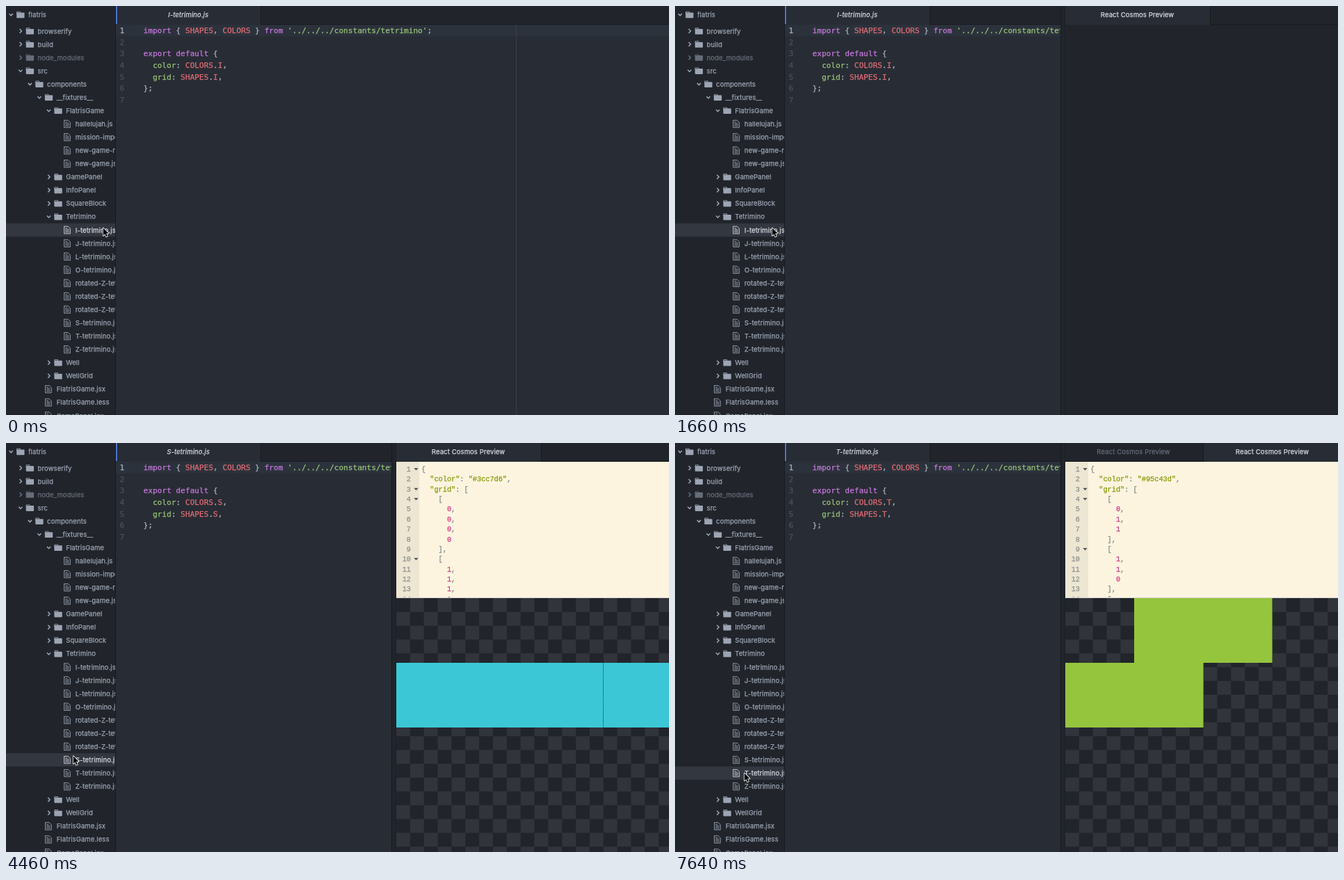
An HTML page with a canvas for the animation above (8 s loop, 953 by 588 pixels).

```html
<!DOCTYPE html>
<html lang="en">
<head>
<meta charset="utf-8">
<title>Editor preview</title>
<style>
html, body { margin: 0; width: 100%; height: 100%; overflow: hidden; background: #282c34; }
canvas { display: block; width: 953px; height: 588px; }
</style>
</head>
<body>
<canvas id="stage"></canvas>
<script>
const W = 953, H = 588, LOOP = 8000;
const canvas = document.getElementById('stage');
const ctx = canvas.getContext('2d');
const dpr = window.devicePixelRatio || 1;
canvas.width = W * dpr;
canvas.height = H * dpr;

const UI = '9.53px Inter, "DejaVu Sans", sans-serif';
const CODE = '11.11px "DejaVu Sans Mono", monospace';
const JSON_FONT = '10.25px "Liberation Mono", monospace';
const C = {
  bg: '#282c34', side: '#21252b', line: '#181a1f', text: '#9da5b4', bright: '#d7dae0',
  dim: '#666c78', row: '#333740', active: '#2c323c', blue: '#568af2',
  plain: '#abb2bf', key: '#c678dd', red: '#e06c75', str: '#98c379'
};

function rect(x, y, w, h, color) {
  ctx.fillStyle = color;
  ctx.fillRect(x, y, w, h);
}

function box(x, y, w, h, r, fill, stroke, lw = 1) {
  ctx.beginPath();
  ctx.roundRect(x, y, w, h, r);
  if (fill) { ctx.fillStyle = fill; ctx.fill(); }
  if (stroke) { ctx.strokeStyle = stroke; ctx.lineWidth = lw; ctx.stroke(); }
}

// A hairline stroke gives the slightly heavier desktop text rendering
function text(s, x, y, color, font = UI, align = 'left') {
  ctx.font = font;
  ctx.letterSpacing = font.includes('Inter') ? '.1px' : '0px';
  ctx.textAlign = align;
  ctx.fillStyle = ctx.strokeStyle = color;
  ctx.lineWidth = .25;
  ctx.fillText(s, x, y);
  ctx.strokeText(s, x, y);
  return x + ctx.measureText(s).width;
}

function clipped(x, y, w, h, draw) {
  ctx.save();
  ctx.beginPath();
  ctx.rect(x, y, w, h);
  ctx.clip();
  draw();
  ctx.restore();
}

function path(points, color, lw) {
  ctx.beginPath();
  points.forEach(([x, y]) => ctx.lineTo(x, y));
  ctx.strokeStyle = color;
  ctx.lineWidth = lw;
  ctx.stroke();
}

// Tree: depth, kind (+ open folder, > closed folder, - file), name
const tree = `0+flatris
1>browserify
1>build
1>node_modules
1+src
2+components
3+__fixtures__
4+FlatrisGame
5-hallelujah.js
5-mission-impossible.js
5-new-game-run.js
5-new-game.js
4>GamePanel
4>InfoPanel
4>SquareBlock
4+Tetrimino
5-I-tetrimino.js
5-J-tetrimino.js
5-L-tetrimino.js
5-O-tetrimino.js
5-rotated-Z-tetrimino-1.js
5-rotated-Z-tetrimino-2.js
5-rotated-Z-tetrimino-3.js
5-S-tetrimino.js
5-T-tetrimino.js
5-Z-tetrimino.js
4>Well
4>WellGrid
3-FlatrisGame.jsx
3-FlatrisGame.less
3-GamePanel.jsx`.split('\n').map(s => ({ depth: +s[0], kind: s[1], name: s.slice(2) }));

function folderIcon(x, y, color) {
  box(x, y - 4.7, 5.6, 4, .8, color);
  box(x, y - 3.1, 11.3, 7.8, .8, color);
  rect(x + .8, y - 3.9, 4, .8, C.side);
}

function fileIcon(x, y, color) {
  path([[x + .4, y - 5.2], [x + 6, y - 5.2], [x + 9.1, y - 2.1], [x + 9.1, y + 5.2],
    [x + .4, y + 5.2], [x + .4, y - 5.6]], color, .9);
  for (let i = 0; i < 4; i++) rect(x + 2, y - 3 + i * 1.9, i ? 5.5 : 3, .8, color);
}

function chevron(x, y, open, color) {
  path(open ? [[x - 2.6, y - 1.4], [x, y + 1.3], [x + 2.6, y - 1.4]]
    : [[x - 1.2, y - 3], [x + 1.6, y], [x - 1.2, y + 3]], color, 1.5);
}

function drawTree(selected) {
  rect(0, 0, 158, H, C.side);
  clipped(0, 0, 157.5, H, () => tree.forEach(({ depth, kind, name }, i) => {
    const y = i ? 36 + 19.07 * (i - 1) : 12.5;
    const on = name === selected + '-tetrimino.js';
    const color = on ? C.bright : name === 'node_modules' ? C.dim : C.text;
    const x = 13.55 * depth;
    if (on) rect(0, y - 9.5, 158, 19, C.row);
    if (kind === '-') fileIcon(x + 15.5, y, color);
    else {
      chevron(x + 7.3, y, kind === '+', color);
      folderIcon(x + 15.2, y, color);
    }
    text(name, x + 32, y + 3.5, color);
  }));
  rect(157, 0, 1, H, C.line);
}

function drawCode(letter, right, caret) {
  rect(158, 0, right - 158, H, C.bg);
  rect(158, 26.7, right - 158, 16.7, C.active);
  if (right === W) rect(733, 27, 1, H, '#3b3f48');
  const lines = [
    [['import', C.key], [' { ', C.plain], ['SHAPES', C.red], [', ', C.plain], ['COLORS', C.red],
      [' } ', C.plain], ['from', C.key], [' ', C.plain],
      ["'../../../constants/tetrimino'", C.str], [';', C.plain]],
    [],
    [['export default', C.key], [' {', C.plain]],
    ...[['color', 'COLORS'], ['grid', 'SHAPES']].map(([prop, from]) =>
      [['  ' + prop, C.str], [': ', C.plain], [from, C.red], ['.', C.plain], [letter, C.red], [',', C.plain]]),
    [['};', C.plain]],
    []
  ];
  clipped(158, 0, right - 158, H, () => lines.forEach((line, i) => {
    const y = 39 + i * 16.67;
    text(i + 1, 163.5, y, i ? '#495162' : C.plain, CODE);
    line.reduce((x, [s, color]) => text(s, x, y, color, CODE), 197.5);
  }));
  if (caret) rect(197.5, 28, 1.6, 15, '#528bff');
  rect(158, 0, right - 158, 27, C.side);
  rect(158, 26, right - 158, 1, C.line);
  rect(158, 0, 208, 27, C.bg);
  rect(366, 0, 1, 27, C.line);
  rect(158, 0, 1.6, 26, C.blue);
  text(letter + '-tetrimino.js', 262, 16, C.bright, 'italic ' + UI, 'center');
}

const shapes = {
  I: { color: '#3cc7d6', grid: [[0, 0, 0, 0], [1, 1, 1, 1], [0, 0, 0, 0], [0, 0, 0, 0]] },
  S: { color: '#95c43d', grid: [[0, 1, 1], [1, 1, 0], [0, 0, 0]] }
};

function tabs(count) {
  const title = 'React Cosmos Preview';
  rect(554, 0, W - 554, H, C.side);
  rect(554, 0, 1, H, C.line);
  rect(560, 0, 1, H, '#1c1f25');
  rect(560, 26, W - 560, 1, C.line);
  if (count === 1) {
    rect(561, 0, 208, 27, C.bg);
    rect(769, 0, 1, 27, C.line);
    text(title, 664.5, 16, C.bright, UI, 'center');
  } else {
    text(title, 659, 16, '#636a77', UI, 'center');
    rect(759, 0, 1, 27, C.line);
    rect(760, 0, W - 760, 27, C.bg);
    text(title, 858.5, 16, C.bright, UI, 'center');
  }
}

function jsonView(shape, folds) {
  rect(561, 27, W - 561, 195, '#fdf4e0');
  rect(561, 27, 33, 195, '#ede6d2');
  const lines = JSON.stringify(shape, null, 2).split('\n').slice(0, 14);
  clipped(561, 27, W - 561, 195, () => lines.forEach((line, i) => {
    const y = 41 + i * 14.36;
    text(i + 1, 582, y, '#8b8f8c', JSON_FONT, 'right');
    if (folds && /[[{]$/.test(line)) {
      ctx.fillStyle = '#4f5558';
      ctx.beginPath();
      ctx.moveTo(586.3, y - 5);
      ctx.lineTo(592.7, y - 5);
      ctx.lineTo(589.5, y - 1.5);
      ctx.fill();
    }
    line.match(/"[^"]*"|\d+|[^"\d]+/g).reduce((x, s) =>
      text(s, x, y, s[0] === '"' ? '#859900' : /\d/.test(s) ? '#d33682' : '#7b8a8c', JSON_FONT), 597);
  }));
  rect(561, 222, W - 561, 1, '#d9d7d0');
}

function blocks({ color, grid }) {
  const size = 19.85;
  clipped(561, 223, W - 561, H - 223, () => {
    for (let r = 0; r < 19; r++)
      for (let c = 0; c < 20; c++)
        if ((r + c) % 2) rect(561 + c * size, 223 + r * size, size, size, '#31343b');
    grid.forEach((row, r) => row.forEach((cell, c) => {
      if (cell) rect(Math.round(561 + c * 99.2), 223 + r * 93, 99.5, 93, color);
    }));
  });
}

const commands = [
  ['About: View Release Notes'], ['Application: About'], ['Application: Add Project Folder', '⇧⌘O'],
  ['Application: Bring All Windows To Front'], ['Application: Hide', '⌘H'],
  ['Application: Hide Other Applications', '⌥⌘H'], ['Application: Install Update'],
  ['Application: Minimize', '⌘M']
];

function drawPalette(query, caret) {
  const found = query.length > 2;
  const listH = found ? 34 : 247;
  rect(0, 0, W, H, 'rgba(15,17,20,.55)');
  ctx.save();
  ctx.shadowColor = 'rgba(0,0,0,.5)';
  ctx.shadowBlur = 8 * dpr;
  ctx.shadowOffsetY = 2 * dpr;
  box(242, -10, 476.5, listH + 50, 4, '#262a31');
  ctx.restore();
  box(249.2, .8, 462.5, 23.2, 3, '#1b1d23', C.blue, 1.6);
  const end = text(query, 255, 16.3, C.bright, CODE);
  if (caret) rect(end, 5, 1.5, 14, '#528bff');

  clipped(249, 32, 463, listH + 1, () => {
    const list = found ? [['React Cosmos: Toggle', '^⇧R']] : commands;
    list.forEach(([label, keys], i) => {
      const y = 32 + i * 34.17;
      rect(250, y, 461, 34.17, i ? '#2c3039' : '#3a3f4b');
      rect(250, y + 33.5, 461, 1, C.line);
      const color = i ? C.text : C.bright, base = y + 20.6;
      if (found) {
        const x = text('React ', 259, base, color);
        text(': Toggle', text('Cosmos', x, base, color, 'bold ' + UI), base, color);
      } else text(label, 259, base, color);
      if (!keys) return;
      const w = keys.length === 2 ? 27 : found ? 34 : 37;
      box(704.5 - w, y + 6.8, w, 20.4, 2, '#484d59', '#585d68');
      text(keys, 704.5 - w / 2, base, C.bright, UI.replace('9.53', '10.3'), 'center');
    });
  });
  path([[249.5, 32], [249.5, 32 + listH], [711.5, 32 + listH], [711.5, 32], [249.5, 32]], C.line, 1);
}

const ease = p => p * p * (3 - 2 * p);
const clamp = p => Math.max(0, Math.min(1, p));

function pointer(t) {
  const first = ease(clamp((Math.floor((t - 2820) / 164) * 164 - 164) / 1148));
  const second = ease(clamp((Math.floor((t - 6370) / 158) * 158 - 158) / 632));
  return [139.7 - 43 * first + 3 * second, 319 + 131 * first + 24.5 * second];
}

function drawPointer(x, y) {
  const points = [[0, 0], [0, 11.2], [2.6, 8.8], [4.3, 12.8], [6.1, 12], [4.4, 8.1], [7.9, 7.9]];
  ctx.beginPath();
  points.forEach(([dx, dy]) => ctx.lineTo(x + dx, y + dy));
  ctx.closePath();
  ctx.strokeStyle = '#fff';
  ctx.lineWidth = 1.6;
  ctx.lineJoin = 'round';
  ctx.stroke();
  ctx.fillStyle = '#000';
  ctx.fill();
}

// Value of the last [time, value] step reached
const at = (t, steps) => steps.reduce((v, [time, value]) => t >= time ? value : v, null);

function draw(t) {
  ctx.setTransform(dpr, 0, 0, dpr, 0, 0);
  ctx.lineJoin = 'miter';
  ctx.miterLimit = 2;
  const split = t >= 1660;
  const letter = at(t, [[0, 'I'], [4296, 'S'], [7490, 'T']]);
  const preview = at(t, [[2560, 'I'], [5980, null], [6370, 'S']]);
  drawTree(at(t, [[0, 'I'], [4132, 'S'], [7160, 'T']]));
  drawCode(letter, split ? 554 : W, t >= 5980 && t < 6370);
  if (split) tabs(t < 5980 ? 1 : 2);
  if (preview) {
    jsonView(shapes[preview], at(t, [[2820, true], [6370, false], [6528, true]]));
    blocks(shapes[preview]);
  }
  if (t >= 300 && !split) {
    const query = at(t, [[300, ''], [530, 'c'], [720, 'cos'], [900, 'cosmo'], [1090, 'cosmos']]);
    drawPalette(query, t >= 530 && t < 1510);
  }
  drawPointer(...pointer(t));
}

const start = performance.now();
function tick() {
  draw((performance.now() - start) % LOOP);
  requestAnimationFrame(tick);
}
tick();
</script>
</body>
</html>
```
